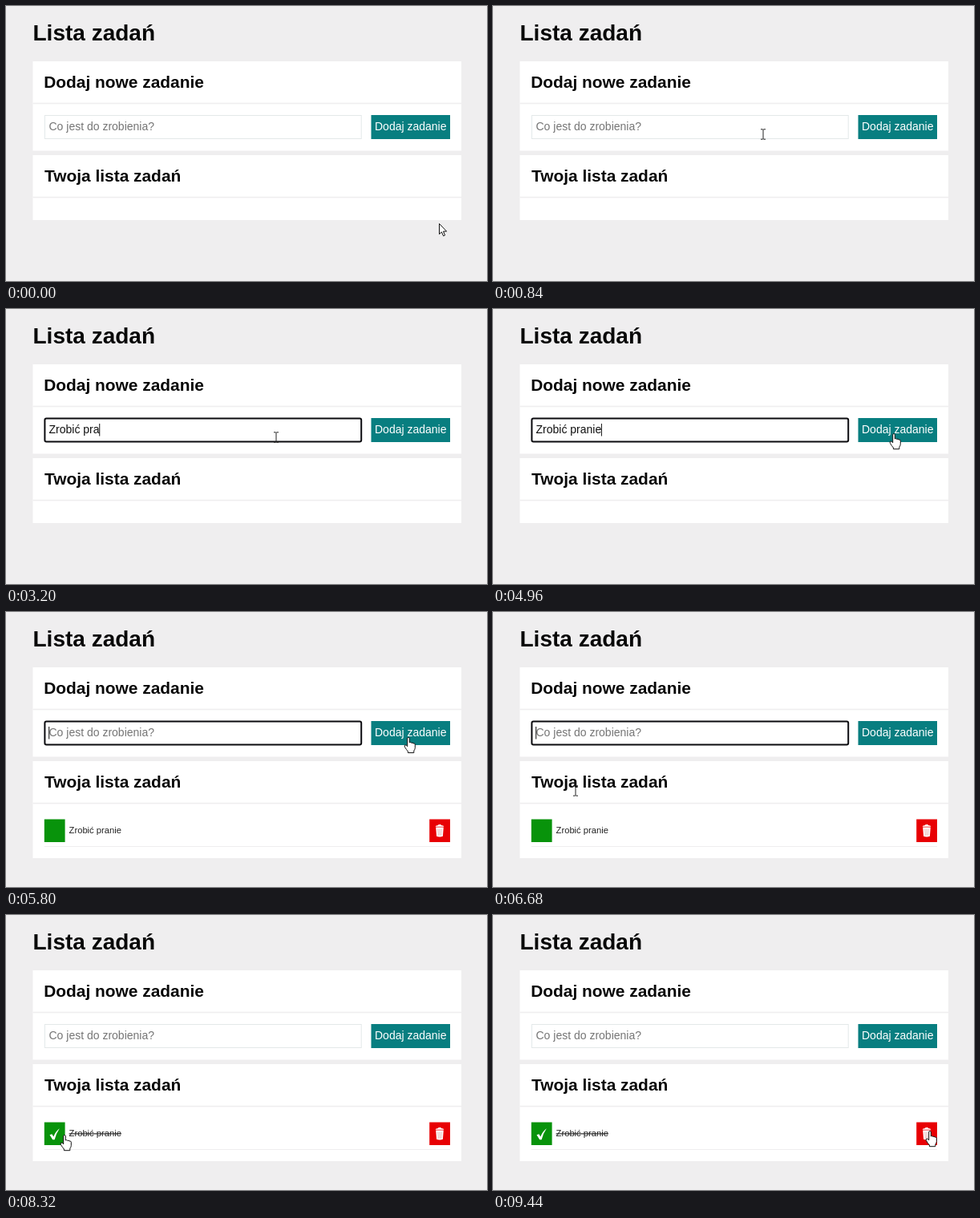
These frames come from a looping animation (600x343 px, 9.48 s). An HTML page:

```html
<!DOCTYPE html>
<html lang="pl">
<head>
<meta charset="utf-8">
<title>Lista zadań</title>
<style>
  html, body { margin: 0; width: 100%; height: 100%; overflow: hidden; background: #efeeef; }
  svg { display: block; width: 600px; height: 343px; }
  text { font: 14px "Liberation Sans", Arial, sans-serif; white-space: pre; fill: #111; }
  .h1 { font-size: 28px; font-weight: bold; fill: #080808; }
  .h2 { font-size: 20.9px; font-weight: bold; fill: #080808; }
  .hint { fill: #757575; }
  .task { font-size: 11.2px; fill: #222; }
  .rule { fill: #efeeef; }
  .cursor path { fill: #fff; stroke: #111; stroke-linejoin: round; }
  .cursor .beam { fill: none; stroke: #222; }
</style>
</head>
<body>
<svg viewBox="0 0 600 343">
  <rect width="600" height="343" fill="#efeeef"/>
  <text class="h1" x="33.5" y="43">Lista zadań</text>

  <rect x="33.5" y="69" width="534.5" height="111.5" fill="#fff"/>
  <rect class="rule" x="33.5" y="120.7" width="534.5" height="1.6"/>
  <text class="h2" x="47.2" y="101.8">Dodaj nowe zadanie</text>
  <rect id="field" x="48.4" y="136.5" width="394.8" height="29" fill="#fff"/>
  <text id="hint" class="hint" x="53.5" y="155.3">Co jest do zrobienia?</text>
  <text id="typed" x="53.5" y="155.3"></text>
  <rect id="caret" y="143" width="1" height="15.5" fill="#111"/>
  <rect x="455.5" y="136" width="98.5" height="30" fill="#087e80"/>
  <text x="460" y="155.3" style="fill:#fff">Dodaj zadanie</text>

  <rect id="list" x="33.5" y="186" width="534.5" height="81" fill="#fff"/>
  <rect class="rule" x="33.5" y="237.8" width="534.5" height="1.6"/>
  <text class="h2" x="48" y="219.3">Twoja lista zadań</text>

  <g id="item">
    <rect x="47.8" y="258.5" width="25.8" height="28.5" fill="#08930b"/>
    <path id="tick" fill="#fff" d="M54.5 274.2L57.3 273.2L59.3 276.5Q61.8 270 66.8 266.3Q62.8 272 60.6 280.3H58.2Z"/>
    <text id="task" class="task" x="78.6" y="276.2">Zrobić pranie</text>
    <rect x="528.2" y="258.5" width="25.8" height="28.5" fill="#e80004"/>
    <path fill="#fff" d="M536.2 268.6h9.6l-.9 11.2q-3.9 1.4-7.8 0zM535.6 267.8q.3-1.5 3.4-1.7l.6-1h2.8l.6 1q3.1.2 3.4 1.7z"/>
    <path stroke="#d99" stroke-width=".7" d="M538.8 270.3l.4 8.6M541 270.3v8.6M543.2 270.3l-.4 8.6"/>
    <rect class="rule" x="47.8" y="292" width="506.2" height="1"/>
  </g>

  <g id="cursor" class="cursor">
    <path id="arrow" d="M.5.5V13.6L3.4 10.9L5.6 15.8L7.6 14.9L5.5 10.1H9.6Z"/>
    <path id="beam" class="beam" d="M-3-6.2H-.8L0-5.5L.8-6.2H3M-3 6.2H-.8L0 5.5L.8 6.2H3M0-5.5V5.5"/>
    <path id="hand" d="M-1.3 1.3Q0-.4 1.3 1.3V7Q2.8 6 3.7 7.4Q5.1 6.6 6 8Q7.8 7.4 8.3 9.2V13.6Q8.2 15.4 6.8 17.2V19.7H-.6V18Q-2.6 15.8-4.6 12.4Q-5.5 10.4-4 9.9Q-2.8 9.8-1.3 11.8Z"/>
  </g>
</svg>
<script>
const LOOP = 9480, STEP = 40;
const FOCUS = 1320, ADD = 5360, BLUR = 7360, CHECK = 7400;
const TASK = "Zrobić pranie";
const KEY_TIMES = [1440, 1840, 2080, 2240, 2400, 2640, 2840, 2960, 3080, 3200, 3520, 3640, 3760];

const smooth = u => u * u * (3 - 2 * u);
const linear = u => u;
const easeIn = u => u ** 1.5;
const easeOut = u => 1 - (1 - u) ** 2;

// [time, x, y, easing towards this point]
const PATH = [
  [0, 540, 271],
  [40, 540, 271, linear],
  [840, 337, 160, smooth],
  [4440, 337, 160, linear],
  [4960, 500, 155, smooth],
  [5200, 502, 155, smooth],
  [5880, 502, 156, linear],
  [6680, 103, 223, smooth],
  [7000, 64, 276, easeOut],
  [7280, 62, 270, smooth],
  [7840, 62, 268, smooth],
  [8200, 62, 268, linear],
  [8320, 73, 274, easeIn],
  [8760, 290, 278, easeIn],
  [9160, 504, 272, easeOut],
  [9440, 545, 269, easeOut],
  [LOOP, 545, 269, linear]
];

const $ = id => document.getElementById(id);
const show = (id, on) => $(id).setAttribute("visibility", on ? "visible" : "hidden");
const set = (id, attrs) => Object.entries(attrs).forEach(([k, v]) => $(id).setAttribute(k, v));

function pointerAt(t) {
  const i = PATH.findIndex(p => p[0] > t);
  const [t0, x0, y0] = PATH[i - 1], [t1, x1, y1, ease] = PATH[i];
  const u = ease((t - t0) / (t1 - t0));
  return [x0 + (x1 - x0) * u, y0 + (y1 - y0) * u];
}

function cursorKind(x, y, added) {
  const over = (l, t, r, b) => x >= l && x <= r && y >= t && y <= b;
  const item = added && y >= 258 && y <= 287;
  if (over(455, 136, 554, 166) || item && (over(47, 0, 74, 343) || over(528, 0, 554, 343))) return "hand";
  if (over(48, 136, 443, 166) || over(48, 200, 217, 225) || added && over(78, 265, 144, 279)) return "beam";
  return "arrow";
}

function draw(t) {
  const added = t >= ADD, done = t >= CHECK;
  const focused = t >= FOCUS && t < BLUR;
  const count = added ? 0 : KEY_TIMES.filter(k => k <= t).length;

  set("field", focused
    ? { stroke: "#0b0b0f", "stroke-width": 2, rx: 2 }
    : { stroke: "#e3e8e9", "stroke-width": 1, rx: 0 });
  $("typed").textContent = TASK.slice(0, count);
  show("hint", !count);

  const lastInput = added ? ADD : count ? KEY_TIMES[count - 1] : FOCUS;
  const width = count ? $("typed").getComputedTextLength() : 0;
  set("caret", { x: 53.2 + width });
  show("caret", focused && (t - lastInput) % 1000 < 510);

  set("list", { height: added ? 121 : 81 });
  $("item").style.display = added ? "" : "none";
  show("tick", done);
  $("task").style.textDecoration = done ? "line-through" : "none";

  const [x, y] = pointerAt(t);
  const kind = cursorKind(x, y, added);
  set("cursor", { transform: `translate(${x.toFixed(2)} ${y.toFixed(2)})` });
  ["arrow", "beam", "hand"].forEach(id => show(id, id === kind));
}

const start = performance.now();
function tick() {
  const t = (performance.now() - start) % LOOP;
  draw(Math.floor(t / STEP) * STEP);
  requestAnimationFrame(tick);
}
tick();
</script>
</body>
</html>
```
